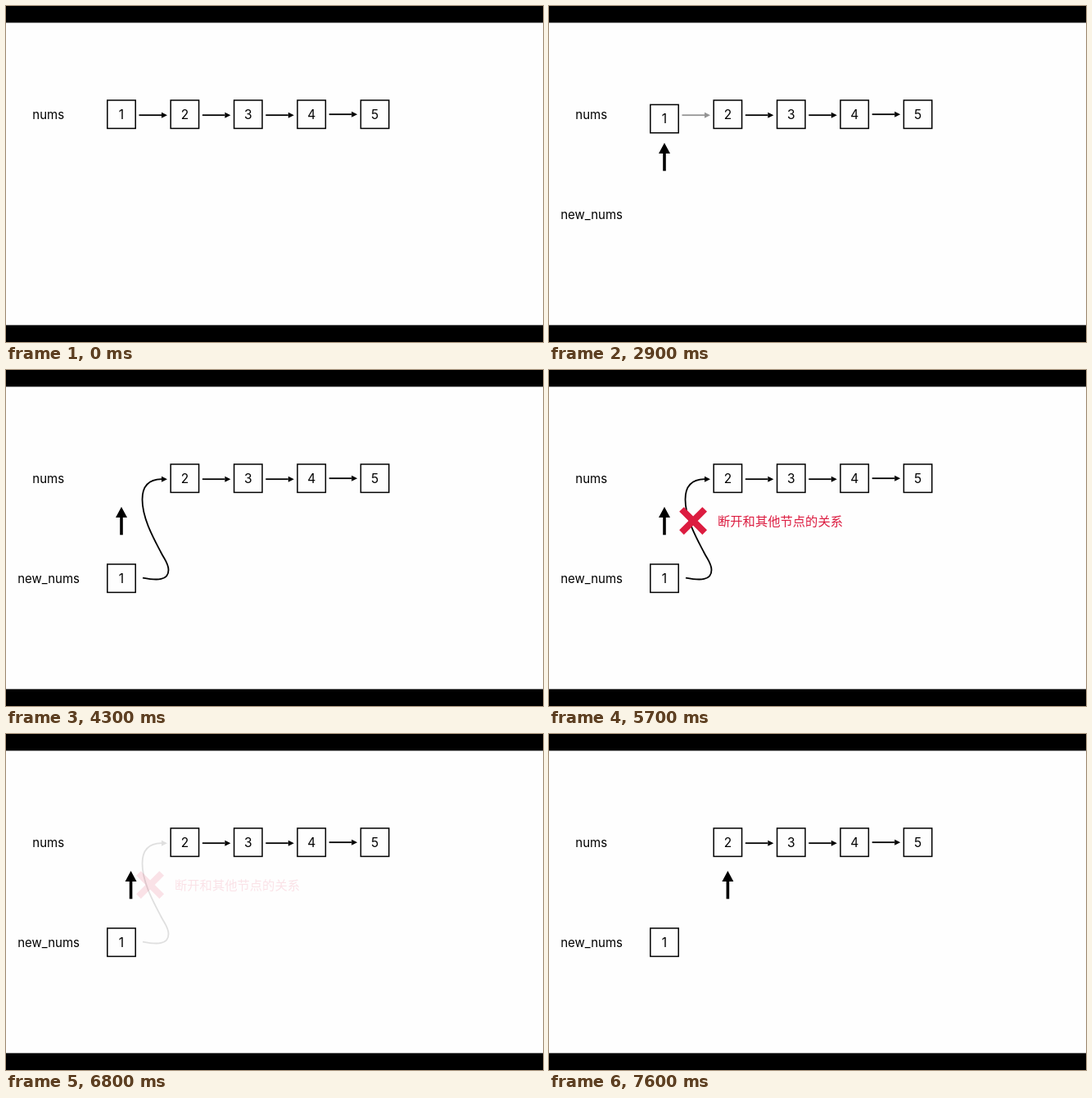
An HTML page with a canvas for the animation above (8 s loop, 656 by 410 pixels).

```html
<!DOCTYPE html>
<html lang="zh">
<head>
<meta charset="utf-8">
<style>
  html, body { margin: 0; width: 100%; height: 100%; overflow: hidden; background: #fefefe; }
  canvas { display: block; }
</style>
</head>
<body>
<canvas id="stage" width="656" height="410"></canvas>
<script>
const ctx = document.getElementById('stage').getContext('2d');
const LOOP = 8000, STEP = 100, FADE = 333;
const INK = '#000', RED = '#dc1c40', PAPER = '#fefefe';
const FIRST_X = 141, GAP = 77.4, LIST_Y = 132.2, NEW_Y = 254.2;
const LATIN = 'Inter, "Liberation Sans", sans-serif';
const HAN = '"Noto Sans CJK SC", "Noto Sans CJK", sans-serif';

const clamp = v => Math.min(1, Math.max(0, v));
const progress = (t, start, duration) => clamp((t - start) / duration);
const ease = p => (1 - Math.cos(Math.PI * p)) / 2;
const fadeIn = (t, start) => progress(t, start, FADE);
const fadeOut = (t, start) => 1 - fadeIn(t, start);

function withAlpha(alpha, draw) {
  if (alpha <= 0) return;
  ctx.globalAlpha = alpha;
  draw();
  ctx.globalAlpha = 1;
}

function label(text, x, y, font, color = INK, align = 'left') {
  ctx.font = font;
  ctx.fillStyle = color;
  ctx.textAlign = align;
  ctx.fillText(text, x, y);
}

function polygon(points) {
  ctx.fillStyle = INK;
  ctx.beginPath();
  points.forEach(([x, y]) => ctx.lineTo(x, y));
  ctx.fill();
}

function strokePath(path, width, color = INK) {
  ctx.strokeStyle = color;
  ctx.lineWidth = width;
  ctx.stroke(new Path2D(path));
}

function node(value, x, y) {
  const size = 34.4;
  ctx.strokeStyle = INK;
  ctx.lineWidth = 1.5;
  ctx.strokeRect(x - size / 2, y - size / 2, size, size);
  label(value, x, y + 5.6, `15.5px ${LATIN}`, INK, 'center');
}

function arrowHead(x, y) {
  polygon([[x, y], [x - 7, y - 3.5], [x - 7, y + 3.5]]);
}

function link(index) {
  const x = 162.5 + index * GAP;
  const y = index === 3 ? 132.2 : 133.2;
  strokePath(`M${x} ${y}h27.5`, 1.8);
  arrowHead(x + 34.5, y);
}

function curvedLink() {
  strokePath('M167 253.6C185 257 198.5 257 198.5 244C198.5 236 194 232 189 222' +
    'C179 203 166.5 180 166.5 158C166.5 142 174 133.5 190 133.2', 1.8);
  arrowHead(197, 133.2);
}

function pointer(x) {
  polygon([[x, 167], [x + 7, 180], [x + 1.8, 180], [x + 1.8, 201.3],
    [x - 1.8, 201.3], [x - 1.8, 180], [x - 7, 180]]);
}

function cutNotice() {
  strokePath('M162 170l28.2 28.2M190.2 170l-28.2 28.2', 8, RED);
  label('断开和其他节点的关系', 206, 190, `15.3px ${HAN}`, RED);
}

function render(t) {
  ctx.fillStyle = INK;
  ctx.fillRect(0, 0, 656, 410);
  ctx.fillStyle = PAPER;
  ctx.fillRect(0, 20.4, 656, 369);

  label('nums', 32.3, 138, `15px ${LATIN}`);
  for (let i = 1; i < 5; i++) node(i + 1, FIRST_X + i * GAP, LIST_Y);
  for (let i = 1; i < 4; i++) link(i);
  withAlpha(fadeOut(t, 2707), () => link(0));

  const drop = ease(progress(t, 2765, 1000));
  node(1, FIRST_X, LIST_Y + (NEW_Y - LIST_Y) * drop);

  const cleared = fadeOut(t, 6507);
  withAlpha(fadeIn(t, 3967) * cleared, curvedLink);
  if (t >= 5700) withAlpha(cleared, cutNotice);

  withAlpha(fadeIn(t, 1967), () => {
    label('new_nums', 14.2, 260, `15px ${LATIN}`);
    pointer(FIRST_X + GAP * ease(progress(t, 6560, 950)));
  });
}

function tick() {
  const t = performance.now() % LOOP;
  render(Math.floor(t / STEP) * STEP);
  requestAnimationFrame(tick);
}
tick();
</script>
</body>
</html>
```
